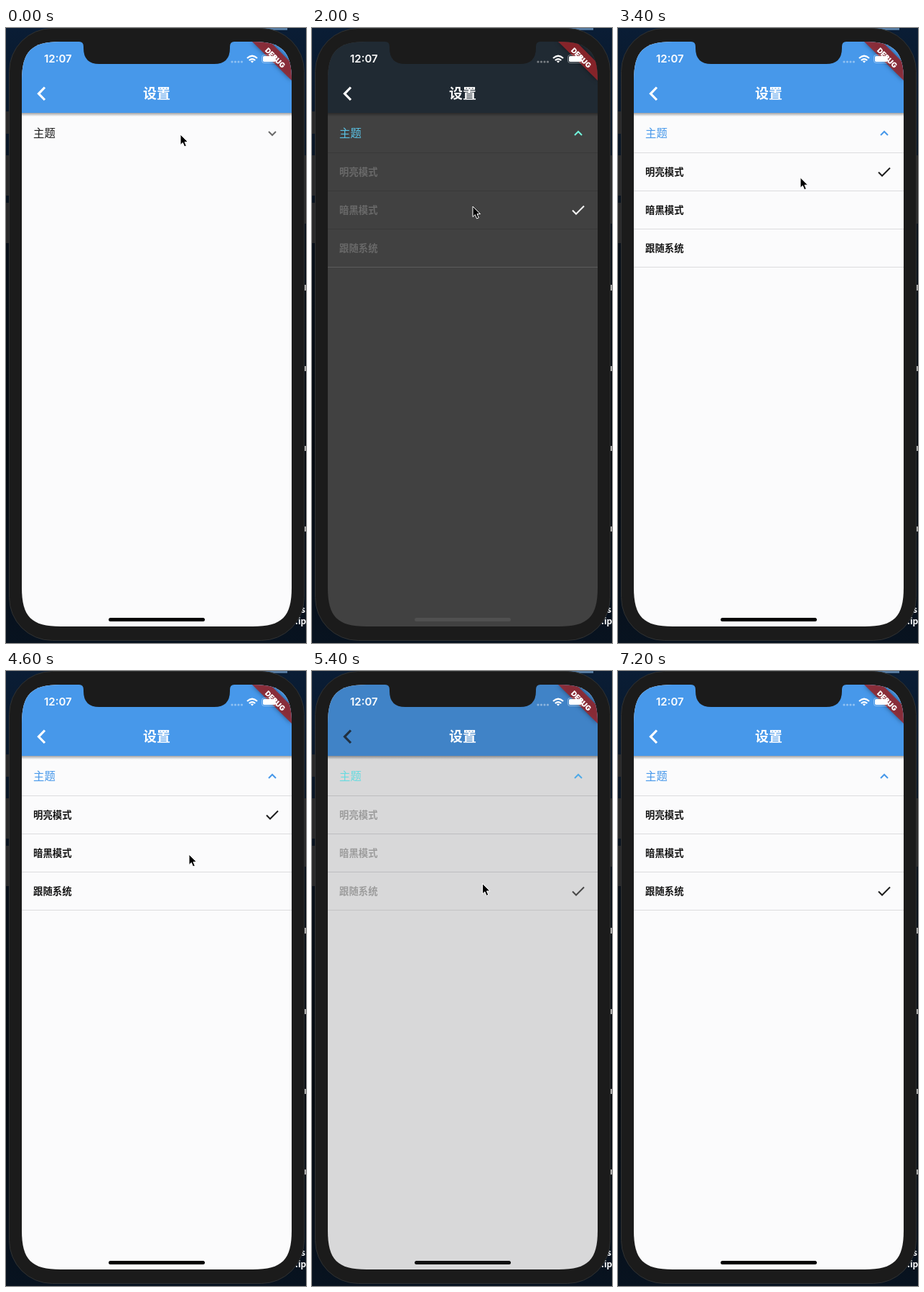
Write an HTML page that moves like this. It is 418x855 px and loops after 7400 ms.

```html
<!DOCTYPE html>
<html lang="zh-CN">
<head>
<meta charset="utf-8">
<title>设置</title>
<style>
html, body { margin: 0; width: 100%; height: 100%; overflow: hidden; background: #050c14; }
svg { display: block; width: 418px; height: 855px; }
text { font-family: "Noto Sans CJK SC", "Noto Sans CJK", sans-serif; }
.latin { font-family: Inter, Roboto, sans-serif; fill: #fff; }
.line { fill: none; }
#bar { fill: var(--bar); }
#page { fill: var(--page); }
#title { fill: var(--title); font-size: 15.4px; }
#list text { fill: var(--text); font-size: 13.4px; font-weight: 600; }
#list rect { fill: var(--rule); }
#end { fill: var(--end); }
#chevron { stroke: var(--chevron); stroke-width: 2; }
#check { stroke: var(--check); stroke-width: 2; }
#back { stroke: var(--back); stroke-width: 3.2; }
#home { fill: var(--home); }
#ribbon { fill: #98262c; fill-opacity: .86; filter: drop-shadow(0 0 3px #0008); }
</style>
</head>
<body>
<svg viewBox="0 0 418 855">
  <defs>
    <linearGradient id="sky" x2="0" y2="1">
      <stop stop-color="#0a1d35"/><stop offset=".35" stop-color="#070f18"/>
      <stop offset=".7" stop-color="#04090f"/><stop offset="1" stop-color="#081320"/>
    </linearGradient>
    <linearGradient id="shade" x2="0" y2="1">
      <stop stop-opacity=".35"/><stop offset="1" stop-opacity="0"/>
    </linearGradient>
    <clipPath id="screen">
      <path d="M22 73C22 32.5 35.5 19 76 19H344C384.5 19 398 32.5 398 73V778C398 818.500 384.500 832 344 832H76C35.500 832 22 818.500 22 778Z"/>
    </clipPath>
    <clipPath id="reveal"><rect id="revealBox" x="22" y="173" width="376"/></clipPath>
  </defs>

  <rect width="418" height="855" fill="url(#sky)"/>
  <path d="M0 116h6v31H0zM0 177h6v56H0zM0 243h6v56H0zM412 177h6v95h-6z" fill="#29292a"/>
  <path d="M335 0h57v3h-57z" fill="#54799f"/>
  <path d="M417 357v8M417 470v7M417 581v7M417 693v7" stroke="#aaa" stroke-width="2"/>
  <g class="latin" font-size="12" font-weight="600"><text x="411" y="813">s</text><text x="403" y="829">.ip</text></g>
  <rect x="4.5" y=".5" width="411" height="851" rx="60" fill="#1b1b1b" stroke="#303233"/>

  <g clip-path="url(#screen)">
    <rect id="page" x="22" y="19" width="376" height="813"/>
    <g clip-path="url(#reveal)"><g id="list"></g></g>
    <rect id="end" x="22" width="376" height="1"/>
    <text id="title" x="38" y="152">主题</text>
    <path id="chevron" class="line" d="M-5 -2.5 0 2.5 5 -2.5"/>
    <path id="check" class="line" d="M363 .5 368 5.5 379 -5.5"/>
    <rect x="22" y="118" width="376" height="5" fill="url(#shade)"/>
    <rect id="bar" x="22" y="19" width="376" height="99"/>
    <path id="back" class="line" d="M54 82.5 45.5 91.3 54 100"/>
    <text x="210" y="98" text-anchor="middle" font-size="19" font-weight="600" fill="#fff">设置</text>
    <path id="ribbon" d="M343 19h25l30 30v24z"/>
    <text class="latin" transform="translate(375 41.5) rotate(45)" y="3.6" text-anchor="middle" font-size="10" font-weight="900">DEBUG</text>
    <rect id="home" x="143" y="820" width="134" height="5" rx="2.5"/>
  </g>

  <path d="M102 18V19Q108 19 108 26V28Q108 50 130 50H290Q312 50 312 28V26Q312 19 318 19V18Z" fill="#1b1b1b"/>
  <text class="latin" x="53" y="48.3" font-size="15" font-weight="600">12:07</text>
  <path d="M315 47h14" stroke="#fff" stroke-opacity=".4" stroke-width="3.2" stroke-linecap="round" stroke-dasharray="0 4.5"/>
  <path class="line" d="M336 42q7-6.5 14 0M338.8 45q4.2-3.8 8.4 0" stroke="#fff" stroke-width="2.2"/>
  <path d="M343 48.5 340.8 46.3q2.200-1.600 4.400 0z" fill="#fff"/>
  <rect x="356.5" y="37.5" width="21" height="11" rx="3" fill="none" stroke="#fff" stroke-opacity=".4"/>
  <rect x="358" y="39" width="18" height="8" rx="1.8" fill="#fff"/>
  <path d="M379 41q2 2 0 4z" fill="#fff" fill-opacity=".5"/>

  <path id="cursor" d="M0 0V14.5L3.3 11.5 5.6 17 8.3 15.8 6 10.5H10.5Z" stroke="#fff"/>
</svg>
<script>
const LOOP = 7400, STEP = 200, TOP = 173, ROW = 53, FULL = 3 * ROW;
const LIGHT = 0, DARK = 1, SYSTEM = 2;
const taps = [[0, SYSTEM], [1820, DARK], [2435, SYSTEM], [3400, LIGHT], [4750, DARK], [5254, SYSTEM]];
// Pointer rests: time, x, y.
const rests = [[0, 243, 148], [1000, 201, 209], [2000, 224, 248], [2350, 242, 292], [2600, 251, 260],
  [3200, 254, 205], [4600, 255, 255], [5300, 235, 295], [6800, 430, 330]];

const $ = id => document.getElementById(id);
const set = (id, attrs) => Object.entries(attrs).forEach(([name, value]) => $(id).setAttribute(name, value));
const ramp = (t, start, length) => Math.min(1, Math.max(0, (t - start) / length));
const smooth = p => p * p * (3 - 2 * p);
const mix = (a, b, p) => `color-mix(in srgb, ${b} ${p * 100}%, ${a})`;

// How dark the theme is, when each tap takes effect after a delay.
function darkness(t, delay, length) {
  return taps.reduce((dark, [time, choice]) => {
    const p = ramp(t, time + delay, length);
    return dark + ((choice === DARK) - dark) * p;
  }, 0);
}

function pointerAt(t) {
  return rests.reduce(([, x, y], [time, nextX, nextY], i) => {
    const from = rests[i - 1][0], p = smooth(ramp(t, from, time - from));
    return [0, x + (nextX - x) * p, y + (nextY - y) * p];
  });
}

$('list').innerHTML = ['明亮模式', '暗黑模式', '跟随系统'].map((name, i) =>
  `<rect x="22" y="${TOP + ROW * i}" width="376" height="1"/>
   <text x="38" y="${TOP + ROW * i + 32}">${name}</text>`).join('');

function draw(t) {
  const open = ramp(t, 400, 200) ** 2;
  const dark = darkness(t, 0, 180), late = darkness(t, 90, 200);
  const choice = taps.filter(([time]) => time <= t).pop()[1];
  const colors = {
    bar: mix('#4798ea', '#202a33', dark),
    page: mix('#fbfbfc', '#414141', dark),
    rule: mix('#dcdcde', '#393939', dark),
    end: mix('#dcdcde', '#5c5c5c', dark),
    title: mix(mix('#1c1c1c', '#4798ea', open), '#72f5dc', late),
    chevron: mix(mix('#6b6b6b', '#4798ea', open), '#72f5dc', dark),
    text: mix('#151515', '#d0d0d0', late),
    check: mix('#1c1c1c', '#fff', dark),
    back: late > dark ? '#213040' : '#fff',
    home: mix('#000', '#505050', dark)
  };
  for (const name in colors) document.body.style.setProperty('--' + name, colors[name]);

  const height = FULL * open, shift = (height - FULL) / 2;
  const [, x, y] = pointerAt(t);
  set('revealBox', { height });
  set('list', { transform: `translate(0 ${shift})` });
  set('end', { y: TOP + height, opacity: open });
  set('chevron', { transform: `translate(371 146.5) rotate(${180 * open})` });
  set('check', { transform: `translate(0 ${TOP + 27 + ROW * choice + shift})`, opacity: Math.floor(open) });
  set('cursor', { transform: `translate(${x} ${y})` });
}

function tick() {
  draw(Math.floor(performance.now() % LOOP / STEP) * STEP);
  requestAnimationFrame(tick);
}
tick();
</script>
</body>
</html>
```
